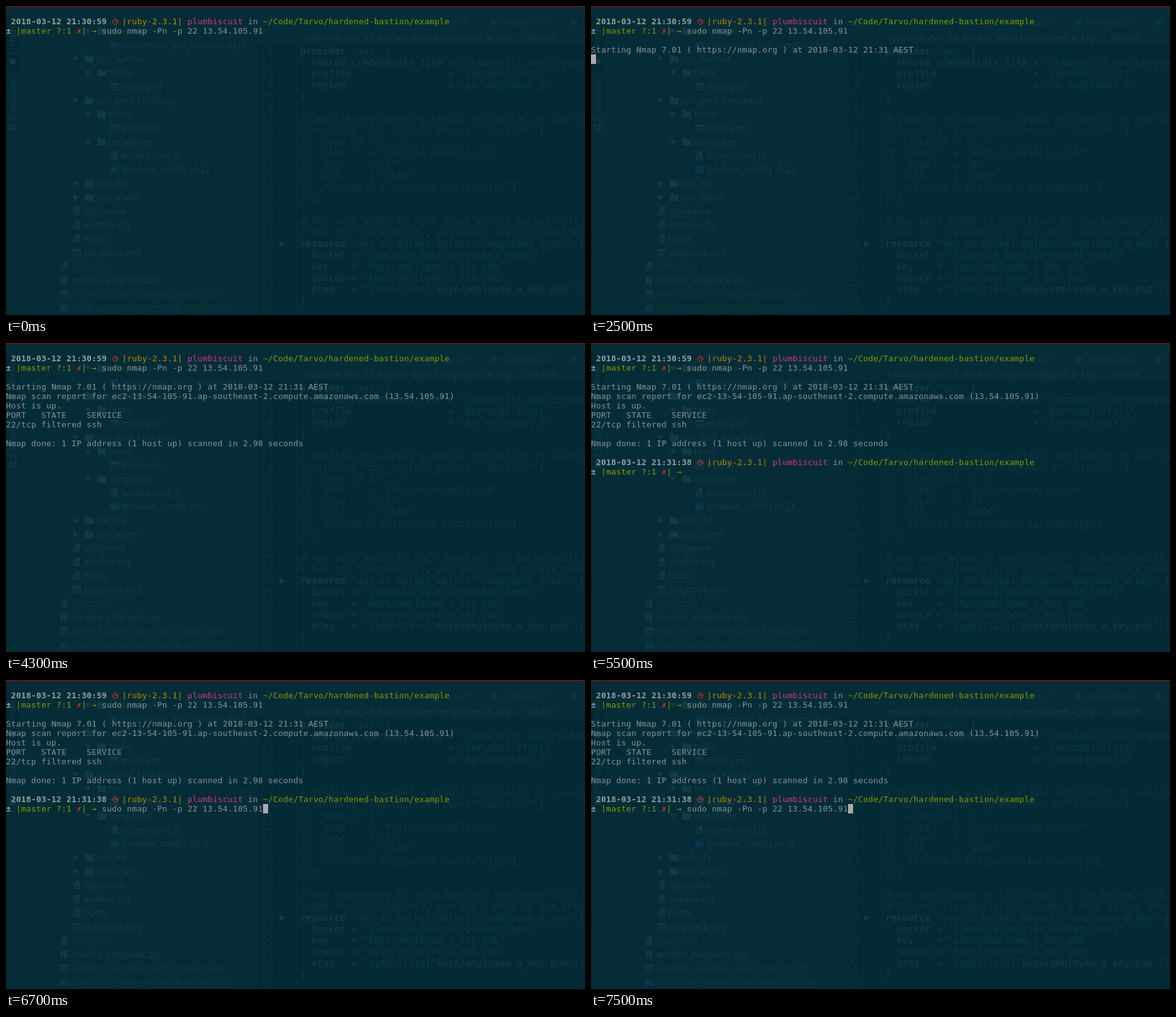
Recreate the animation shown at these times as an HTML page with a canvas. Size 919 by 491 pixels, loop 8000 ms.

```html
<!DOCTYPE html>
<html lang="en">
<head>
<meta charset="utf-8">
<title>Terminal session</title>
<style>
  html, body { margin: 0; width: 100%; height: 100%; overflow: hidden; background: #042b35; }
  canvas { display: block; width: 919px; height: 491px; }
</style>
</head>
<body>
<canvas id="stage" width="919" height="491"></canvas>
<script>
const W = 919, H = 491, LOOP = 8000;
const CELL = 8, LINE = 15, TOP = 2, COLS = 115, INPUT_COL = 19;
const MONO = '"DejaVu Sans Mono", monospace';
const SANS = '"Noto Sans", sans-serif';
const C = {
  fg: '#839496', bright: '#93a1a1', red: '#dc322f', yellow: '#b58900',
  magenta: '#d33682', green: '#859900', cursor: '#aaaaaa'
};

// ---------- dim editor behind the terminal ----------
const back = document.createElement('canvas');
back.width = W;
back.height = H;
const b = back.getContext('2d');
const PANEL = '#062d37', EDITOR = '#042b35';
const INK = '#153c46', DIM = '#0e343c', STRING = '#0d373d', ICON = '#113a45', NUMBER = '#0a323c';

function box(x, y, w, h, color) {
  b.fillStyle = color;
  b.fillRect(x, y, w, h);
}

function label(text, x, y, color = INK, font = `14.67px ${SANS}`) {
  b.font = font;
  b.fillStyle = color;
  b.fillText(text, x, y);
}

function arrow(x, y, open) {
  b.fillStyle = INK;
  b.beginPath();
  if (open) {
    b.moveTo(x - 5, y - 3); b.lineTo(x + 5, y - 3); b.lineTo(x, y + 4);
  } else {
    b.moveTo(x - 3, y - 5); b.lineTo(x + 5, y); b.lineTo(x - 3, y + 5);
  }
  b.fill();
}

const icons = {
  folder(x, y) {
    box(x, y - 6, 6, 3, ICON);
    box(x, y - 4, 14, 10, ICON);
  },
  table(x, y) {
    b.strokeStyle = ICON;
    b.strokeRect(x + .5, y - 5.5, 12, 11);
    box(x, y - 5, 13, 3, ICON);
    box(x + 4, y - 5, 1, 10, ICON);
    box(x + 8, y - 5, 1, 10, ICON);
    box(x, y + 1, 13, 1, ICON);
  },
  file(x, y) {
    box(x + 4, y - 7, 7, 4, ICON);
    box(x + 1, y - 3, 10, 9, ICON);
    for (const dy of [-1, 1, 3]) box(x + 3, y + dy, 6, 1, PANEL);
  },
  shell(x, y) {
    box(x, y - 5, 13, 11, '#08344a');
    b.strokeStyle = '#1a4652';
    b.beginPath();
    b.moveTo(x + 2, y - 3); b.lineTo(x + 5, y); b.lineTo(x + 2, y + 3);
    b.stroke();
  },
  zip(x, y) {
    box(x + 1, y - 6, 10, 12, ICON);
    box(x + 5, y - 6, 1, 12, PANEL);
  }
};

// icon, icon x, name, folder state, dimmed
const tree = [
  ['folder', 145, 'templates', 'open'],
  ['shell', 166, 'ephemeral_ssh_session.sh.j2'],
  ['folder', 125, 'ssh_banner', 'open'],
  ['folder', 145, 'tasks', 'open'],
  ['table', 166, 'main.yml'],
  ['folder', 125, 'ssh_port_knocking', 'open'],
  ['folder', 145, 'tasks', 'open'],
  ['table', 166, 'main.yml'],
  ['folder', 145, 'templates', 'open'],
  ['file', 166, 'access.conf.j2'],
  ['shell', 166, 'iptables_config.sh.j2'],
  ['folder', 125, 'ssh_tfa', 'closed'],
  ['folder', 125, 'ssh_users', 'closed'],
  ['file', 106, '.gitignore'],
  ['file', 106, 'ansible.cfg'],
  ['file', 106, 'hosts'],
  ['table', 106, 'playbook.yml'],
  ['file', 86, '.gitignore', '', true],
  ['zip', 86, 'ansible_playbook.zip'],
  ['table', 86, 'ansible_terraform_bridge_vars.yml', '', true],
  ['shell', 86, 'bootstrap_static_network_address.sh', '', true]
];

const source = `provider "aws" {
  shared_credentials_file = "/home/kit/.aws/credentials"
  profile                 = "personal-tfcli"
  region                  = "ap-southeast-2"
}

# Imagine you wanted a static entrypoint to your bastion
//resource "aws_route53_record" "bastion" {
//  zone_id = "..."
//  name    = "bastion.example.com"
//  type    = "A"
//  ttl     = "3600"
//  records = ["\${module.bastion.ip}"]
//}

# Any keys added to this level of the bucket will
# Bad for traceability, you don't need to use these
resource "aws_s3_bucket_object" "employee_a_key" {
  bucket = "\${module.bastion.bucket_name}"
  key    = "keys/employee_a_key.pub"
  source = "keys/employee_a_key.pub"
  etag   = "\${md5(file("keys/employee_a_key.pub"))}"
}
`.split('\n');

function drawTree() {
  tree.forEach(([icon, x, name, state, dim], i) => {
    const y = 40 + i * 22;
    if (state) arrow(x - 15, y, state === 'open');
    icons[icon](x, y);
    label(name, x + (icon === 'folder' ? 18 : 17), y + 5, dim ? DIM : INK);
  });
}

function drawSource() {
  const font = `15px ${MONO}`;
  source.forEach((line, i) => {
    const y = 77 + i * 18;
    b.textAlign = 'right';
    label(i + 1, 425, y, NUMBER, font);
    b.textAlign = 'left';
    const comment = /^(#|\/\/)/.test(line);
    const parts = comment ? [line] : line.split(/(^provider|^resource|"[^"]*")/);
    let col = 0;
    for (const part of parts) {
      const keyword = /^(provider|resource)$/.test(part);
      const color = comment ? DIM : part[0] === '"' ? STRING : INK;
      label(part, 467 + col * 9.03, y, color, (keyword ? 'bold ' : '') + font);
      col += part.length;
    }
  });
  arrow(437, 378, false);
}

function sideLabel(text, y) {
  b.save();
  b.translate(15, y);
  b.rotate(-Math.PI / 2);
  label(text, 0, 0, INK, `12px ${SANS}`);
  box(0, 2, 7, 1, INK);
  b.restore();
}

function drawBackdrop() {
  box(0, 0, W, H, PANEL);
  box(0, 17, 20, 87, '#042932');
  box(20, 0, 1, H, '#052a33');
  box(400, 60, W - 400, H - 60, EDITOR);
  box(400, 0, 1, H, '#052a33');
  box(461, 61, 1, H - 61, '#08303a');
  sideLabel('1: Project', 78);
  sideLabel('7: Structure', 183);
  box(6, 84, 9, 8, ICON);
  for (const [x, y] of [[6, 188], [12, 188], [6, 194], [12, 194]]) box(x, y, 4, 4, ICON);
  drawTree();
  label('main.tf', 684, 31, DIM);
  label('variables.tf', 785, 31, DIM);
  for (const x of [774, 901]) {
    b.fillStyle = '#0b3547';
    b.beginPath();
    b.arc(x, 26, 5, 0, 7);
    b.fill();
  }
  label('resource aws_s3_bucket_object employee_a_key', 471, 55);
  label('›', 811, 55, DIM);
  label('source', 825, 55);
  drawSource();
  box(0, 0, W, 1, '#be0000');
}

// ---------- terminal ----------
const ctx = document.getElementById('stage').getContext('2d');

function put(text, col, row, color = C.fg, bold = false) {
  ctx.font = `${bold ? 'bold ' : ''}13px ${MONO}`;
  ctx.fillStyle = color;
  [...text].forEach((ch, i) => {
    if (ch !== ' ') ctx.fillText(ch, (col + i) * CELL, TOP + row * LINE + 12);
  });
}

function clock(row) {
  const x = 173.5, y = TOP + row * LINE + 8;
  ctx.strokeStyle = C.red;
  ctx.lineWidth = 1;
  ctx.beginPath();
  ctx.arc(x, y, 4.2, 0, Math.PI * 2);
  ctx.moveTo(x, y - 4);
  ctx.lineTo(x, y);
  ctx.lineTo(x + 4, y);
  ctx.stroke();
}

function prompt(row, time) {
  put('2018-03-12 ' + time, 1, row, C.bright, true);
  clock(row);
  put('|ruby-2.3.1|', 23, row, C.yellow);
  put('plumbiscuit', 36, row, C.magenta);
  put('in', 48, row);
  put('~/Code/Tarvo/hardened-bastion/example', 51, row, C.green);
  put('±', 0, row + 1, C.bright, true);
  put('|master ?:1', 2, row + 1, C.green);
  put('✗', 14, row + 1, C.red);
  put('|', 15, row + 1, C.green);
  put('→', 17, row + 1, C.green);
}

function input(text, row) {
  const room = COLS - INPUT_COL;
  put(text.slice(0, room), INPUT_COL, row);
  put(text.slice(room), 0, row + 1);
}

function cursorAt(cell, row) {
  ctx.fillStyle = C.cursor;
  ctx.fillRect(cell % COLS * CELL, TOP + (row + Math.floor(cell / COLS)) * LINE, CELL, LINE);
}

const SCAN = 'sudo nmap -Pn -p 22 13.54.105.91';
const LOGIN = 'ssh ubuntu@13.54.105.91';
const KNOCK = 'for port in 7000 8000 9000; do nmap -Pn --host-timeout 201 --max-retries 0 -p $port 13.54.105.91; done';
const report = [
  'Nmap scan report for ec2-13-54-105-91.ap-southeast-2.compute.amazonaws.com (13.54.105.91)',
  'Host is up.',
  'PORT   STATE    SERVICE',
  '22/tcp filtered ssh',
  '',
  'Nmap done: 1 IP address (1 host up) scanned in 2.98 seconds'
];

// start ms, stage (0 typed, 1 scanning, 2 reported, 3 new prompt), cursor on, recalled command
const steps = [
  [0, 0, false], [500, 0, true], [1100, 0, false],
  [1300, 1, true], [1900, 1, false], [2500, 1, true], [3100, 1, false], [3700, 1, true],
  [4300, 2, false],
  [4400, 3, false, ''], [4900, 3, true, ''], [5500, 3, false, ''],
  [5800, 3, true, SCAN], [6200, 3, true, 'clear'], [6500, 3, true, LOGIN],
  [6700, 3, true, SCAN], [7300, 3, true, KNOCK], [7500, 3, true, SCAN]
];

function draw([, stage, cursor, command]) {
  ctx.drawImage(back, 0, 0);
  prompt(1, '21:30:59');
  input(SCAN, 2);
  if (stage >= 1) put('Starting Nmap 7.01 ( https://nmap.org ) at 2018-03-12 21:31 AEST', 0, 4);
  if (stage >= 2) report.forEach((line, i) => put(line, 0, 5 + i));
  if (stage === 3) {
    prompt(12, '21:31:38');
    input(command, 13);
  }
  if (!cursor) return;
  if (stage === 0) cursorAt(INPUT_COL + SCAN.length, 2);
  else if (stage === 1) cursorAt(0, 5);
  else cursorAt(INPUT_COL + command.length, 13);
}

function tick() {
  const t = performance.now() % LOOP;
  draw(steps.findLast(([start]) => start <= t));
  requestAnimationFrame(tick);
}

drawBackdrop();
tick();
</script>
</body>
</html>
```
